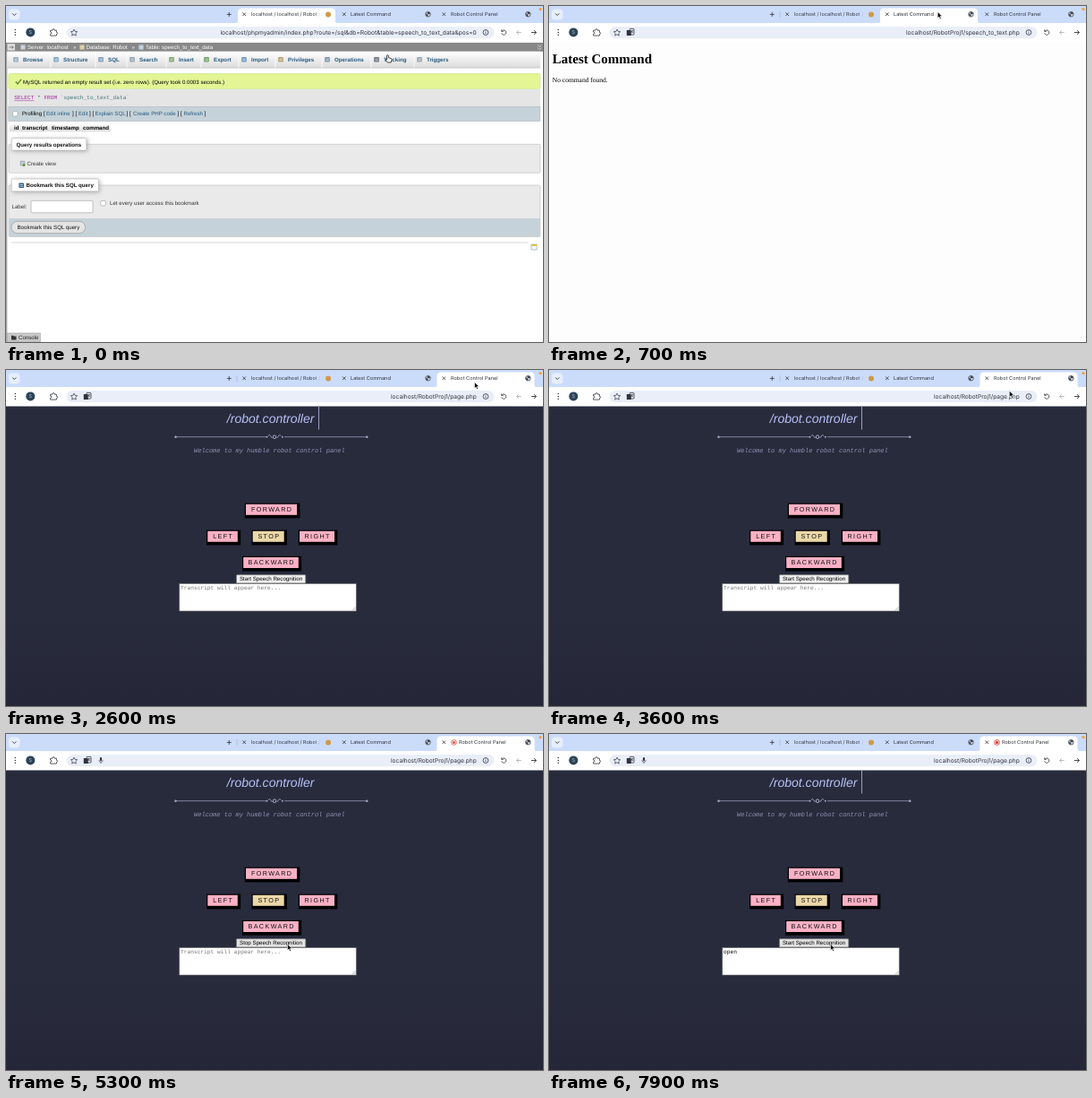
Recreate the animation shown at these times as an HTML page. Size 600 px wide and 375 px high, loop 8 s.

```html
<!DOCTYPE html>
<html lang="en">
<head>
<meta charset="utf-8">
<style>
html, body { margin: 0; width: 100%; height: 100%; overflow: hidden; background: #fdfdfd }
svg { display: block; width: 600px; height: 375px }
text { white-space: pre; text-rendering: geometricPrecision }
.ui { font-family: Inter, Roboto, sans-serif }
.sans { font-family: "Liberation Sans", Arial, sans-serif }
.serif { font-family: "Liberation Serif", Times, serif }
.mono { font-family: "Liberation Mono", "Courier New", monospace }
.b { font-weight: bold }
.i { font-style: italic }
.mid { text-anchor: middle }
.end { text-anchor: end }
.legend { filter: drop-shadow(1.4px 1.4px 2.4px #aaa) }
</style>
</head>
<body>
<svg id="stage" viewBox="0 0 600 375">
  <defs>
    <linearGradient id="menu" x2="0" y2="1"><stop stop-color="#fff"/><stop offset="1" stop-color="#dcdcdc"/></linearGradient>
    <linearGradient id="night" x2="0" y2="1"><stop offset=".7" stop-color="#282b3c"/><stop offset="1" stop-color="#252738"/></linearGradient>
    <linearGradient id="fade"><stop stop-color="#cbdcfb" stop-opacity="0"/><stop offset="1" stop-color="#cbdcfb"/></linearGradient>
    <linearGradient id="fadeOn"><stop stop-color="#fff" stop-opacity="0"/><stop offset="1" stop-color="#fff"/></linearGradient>
  </defs>
</svg>
<script>
const LOOP = 8000, OPEN_COMMAND = 500, OPEN_PANEL = 2600, LISTEN = 4700, HEARD = 6700, DONE = 7500;
const stage = document.getElementById('stage');

const attrs = o => Object.entries(o).map(([k, v]) => ` ${k}="${v}"`).join('');
const rect = (x, y, w, h, fill, o = {}) => `<rect x="${x}" y="${y}" width="${w}" height="${h}" fill="${fill}"${attrs(o)}/>`;
const dot = (x, y, r, fill, o = {}) => `<circle cx="${x}" cy="${y}" r="${r}" fill="${fill}"${attrs(o)}/>`;
const line = (d, stroke, w = 1, o = {}) => `<path d="${d}" fill="none" stroke="${stroke}" stroke-width="${w}"${attrs(o)}/>`;
const text = (s, x, y, size, fill, cls, o = {}) =>
  `<text x="${x}" y="${y}" font-size="${size}" fill="${fill}" class="${cls}"${attrs(o)}>${s.replace(/&/g, '&amp;')}</text>`;
const group = (id, body) => `<g id="${id}">${body}</g>`;

const INK = '#30343b', LINK = '#235a81';
const cross = x => line(`M${x - 1.8} 7.4l3.6 3.6m0-3.6l-3.6 3.6`, INK, .8);
const globe = x => dot(x, 9.2, 2.8, '#dfe6f2', { stroke: '#3f4650', 'stroke-width': .8 }) +
  `<path d="M${x - 2.6} 8.6l2 .6.8 1.4-.6 1.4q-2-.8-2.2-3.4zM${x - .4} 6.6q2.4-.2 3 2l-1.8.8-1.8-1z" fill="#3f4650"/>`;

function chrome() {
  const tabShape = x => `<path d="M${x - 4} 20q4 0 4-4V7q0-4.5 4.5-4.5h100q4.5 0 4.5 4.5v9q0 4 4 4z" fill="#fff"/>`;
  return rect(0, 0, 600, 20, '#cbdcfb') + rect(0, 19, 600, 21.5, '#fff') +
    group('active', tabShape(0)) +
    rect(0, 3, 109, 14, '#a1c1f6', { rx: 5, id: 'hover' }) +
    rect(3, 3.5, 12.5, 12, '#e6eefc', { rx: 4 }) + line('M7.2 8.4l2.1 2.1 2.1-2.1', INK, .9) +
    line('M246.8 9.4h5m-2.5-2.5v5', INK, .8) +
    line('M258 6v7', '#9fb3d6', .6, { id: 'sep' }) +
    cross(266.2) + text('localhost / localhost / Robot / s', 274, 11.4, 5.6, INK, 'ui') +
    rect(344, 4, 8, 12, 'url(#fade)', { id: 'fadeRect' }) + rect(352, 4, 16, 12, '#cbdcfb', { id: 'fadeEnd' }) +
    dot(360, 9.4, 3, '#d09a48') +
    cross(377.8) + text('Latest Command', 385, 11.4, 5.6, INK, 'ui') + globe(471.5) +
    cross(489.3) + text('Robot Control Panel', 497, 11.4, 5.6, INK, 'ui', { id: 'panelTitle' }) + globe(583.3) +
    group('rec', dot(500.5, 9.4, 2.9, 'none', { stroke: '#d93b30', 'stroke-width': .9 }) + dot(500.5, 9.4, 1.7, '#d93b30')) +
    dot(597, 3.6, 1.7, '#f2a33c') +
    [26.6, 29.4, 32.2].map(y => dot(10.3, y, .75, INK)).join('') +
    dot(27.3, 29.4, 5, '#2b4358') + text('S', 27.3, 31.4, 5.4, '#b8c9d6', 'ui mid') +
    line('M49.6 27.2h2.2q0-1.6 1.3-1.6t1.3 1.6h2v2.2q1.2 0 1.2 1t-1.2 1v1.7h-6.8v-1.9q1.4 0 1.4-1.1t-1.4-1.1z', INK, .8) +
    rect(67.5, 23, 478, 13.2, '#e9eef8', { rx: 6.6 }) +
    `<path d="M76 26l1.1 2.4 2.6.3-1.9 1.8.5 2.6-2.3-1.3-2.3 1.3.5-2.6-1.9-1.8 2.6-.3z" fill="none" stroke="${INK}" stroke-width=".7"/>` +
    group('translate', rect(90, 25.4, 5, 6.6, '#e9eef8', { stroke: INK, 'stroke-width': .8, rx: .6 }) + rect(86.8, 27, 5, 6, INK, { rx: .6 }) +
      line('M91.8 27.6h2.6m-1.3-.6v.6q0 1.6-1.3 2.4m.4-1.6l2 1.7', INK, .6)) +
    group('mic', rect(104.9, 26, 2.2, 4.2, INK, { rx: 1.1 }) + line('M103.8 29q0 2.4 2.2 2.4t2.2-2.4M106 31.4v1.7', INK, .6)) +
    text('', 525.8, 31.9, 6.62, INK, 'ui end', { id: 'url' }) +
    dot(536, 29.5, 2.9, 'none', { stroke: INK, 'stroke-width': .8 }) + line('M536 29.2v1.8M536 27.7v.8', INK, .7) +
    line('M554 28.2a2.6 2.6 0 1 1-.3 2.1M553.7 26.4v2h2', INK, .8) +
    line('M575.6 29.5h-5m2.2-2.3l-2.3 2.3 2.3 2.3', '#a5a9b0', .8) +
    line('M587 29.5h5.3m-2.3-2.4l2.4 2.4-2.4 2.4', INK, .9);
}

function database() {
  const menu = [['Browse', 19, '#8fa6ba'], ['Structure', 64, '#7fa4c8'], ['SQL', 114, '#7d9cbc'], ['Search', 149, '#8fa1b0'],
    ['Insert', 193, '#7ba46b'], ['Export', 232, '#6f9f62'], ['Import', 274, '#6c93b8'], ['Privileges', 315, '#b3a070'],
    ['Operations', 367, '#7890a8'], ['Tracking', 422, '#66707a'], ['Triggers', 470, '#93a2b0']];
  const icon = (x, y, c) => rect(x - 2.8, y - 2.8, 5.6, 5.6, c, { rx: .8 }) + line(`M${x - 1.6} ${y - .8}h3.4m-3.4 1.8h3.4`, '#fff', .6);
  const round = { rx: 1.5, stroke: '#b9b9b9', 'stroke-width': .6 };
  const field = { stroke: '#9a9a9a', 'stroke-width': .6 };
  const legend = (x, y, w, h) => rect(x, y, w, h, '#fff', { rx: 1, stroke: '#aaa', 'stroke-width': .5, class: 'legend' });
  const sans = (s, x, y, fill = '#333', cls = '') => text(s, x, y, 6.15, fill, 'sans ' + cls);
  return rect(0, 40, 600, 335, '#fff') +
    rect(0, 40.8, 600, 10, '#888') + rect(0, 50.8, 1.4, 325, '#aaa') +
    rect(1.5, 42.2, 8.5, 7.4, '#ddd') + line('M3.6 46h4.6m-1.6-1.5l1.6 1.5-1.6 1.5', '#555', .7) +
    icon(19, 46, '#b8bfc6') + sans('Server: localhost', 24, 48.2, '#fff') +
    sans('»', 75, 48.2, '#fff') + icon(85, 46, '#c9bd90') + sans('Database: Robot', 89.5, 48.2, '#fff') +
    sans('»', 140.5, 48.2, '#fff') + icon(151, 46, '#aebfd0') + sans('Table: speech_to_text_data', 156, 48.2, '#fff') +
    line('M594 43.6l2.2 2 2.2-2m-4.4 3l2.2 2 2.2-2', '#eee', .7) +
    rect(1.4, 50.8, 595.6, 18, 'url(#menu)') + line('M1.4 69h595.6', '#aaa', .6) +
    menu.map(([s, x, c], n) => icon(x - 8, 59.8, c) + (n ? line(`M${x - 14} 52v17`, '#fff', .8) : '') +
      text(s, x, 62, 6.2, LINK, 'sans b')).join('') +
    rect(2.8, 75.6, 594, 16.8, '#e4f596', { rx: 1.5, stroke: '#b9dc6a', 'stroke-width': .5 }) +
    line('M10.8 84.6l2.2 2.3 4-5', '#5f8f2e', 1.5) +
    sans('MySQL returned an empty result set (i.e. zero rows). (Query took 0.0003 seconds.)', 19, 86.6, '#000') +
    rect(2.5, 92.8, 594.5, 19.4, '#e5e5e5') +
    text('<tspan fill="#a3299c">SELECT</tspan> <tspan fill="#555">*</tspan> <tspan fill="#a3299c">FROM</tspan> `speech_to_text_data`', 9.3, 104, 6.13, '#477', 'mono') +
    line('M9.3 105.6h22', '#a3299c', .5) +
    rect(2.8, 112.3, 594, 16.2, '#c6d2d9', { stroke: '#aaa', 'stroke-width': .5 }) +
    rect(7.6, 117.6, 5.4, 5.4, '#fff', { ...field, rx: 1 }) +
    ['Profiling', '[', 'Edit inline', '] [', 'Edit', '] [', 'Explain SQL', '] [', 'Create PHP code', '] [', 'Refresh', ']']
      .map((s, n) => sans(s, [18, 42, 45, 74, 81, 93, 99.5, 134.5, 142, 191.5, 198.5, 221.5][n], 122.3, n > 1 && n % 2 == 0 ? LINK : '#000')).join('') +
    rect(3.5, 130.8, 113.5, 9.4, 'url(#menu)') +
    [['id', 9], ['transcript', 18], ['timestamp', 51], ['command', 86]].map(([s, x]) => text(s, x, 137.6, 6.15, '#000', 'sans b')).join('') +
    rect(3, 154.3, 594, 32, '#eaeaea', round) + legend(6.3, 147.6, 83.5, 13.4) + sans('Query results operations', 11.5, 156.5, '#111', 'b') +
    icon(18.5, 175.5, '#a7b0b8') + dot(20, 177.5, 1.6, '#5b9a3e') + sans('Create view', 23.5, 177.7) +
    rect(3, 200, 594, 57.5, '#eaeaea', round) + rect(3.3, 237, 593.4, 20, '#c6d2d9') +
    legend(6.3, 193, 97, 13.8) + icon(17.2, 200.3, '#35658c') + sans('Bookmark this SQL query', 22.5, 202.2, '#111', 'b') +
    sans('Label:', 6.5, 226) + rect(28, 217.3, 69, 13.5, '#fff', { ...field, rx: 1 }) +
    rect(105.8, 217.4, 5.5, 5.5, '#fff', { ...field, rx: 1 }) + sans('Let every user access this bookmark', 116, 222.3) +
    rect(6, 240.3, 82.5, 13.4, '#e4e4e4', { rx: 6.5, stroke: '#999', 'stroke-width': .7 }) + sans('Bookmark this SQL query', 12.5, 249.2, '#111') +
    line('M6 264h577', '#c4c4c4', .7) + rect(587, 266, 6, 6, '#fbfbfb', { stroke: '#8294a8', 'stroke-width': .6 }) + rect(587, 266, 6, 2, '#dcc24a') +
    rect(1.4, 365, 37, 10, '#c9c9c9', { stroke: '#999', 'stroke-width': .5 }) + rect(6, 368.6, 5.5, 4, '#333') + rect(6, 367.8, 2.6, 1.6, '#333') +
    sans('Console', 14, 372.4, '#222');
}

const command = () => rect(0, 40, 600, 335, '#fdfdfd') +
  text('Latest Command', 3.8, 64.4, 15, '#000', 'serif b') + text('No command found.', 3.8, 85.2, 7.5, '#000', 'serif');

function panel() {
  const key = (s, x, y, w, fill = '#fbb1c5') => rect(x - 1.2, y - 1.2, w + 4.5, 16.8, '#000') + rect(x, y, w, 12, fill) +
    text(s, x + w / 2 + .7, y + 8.4, 7.2, '#111', 'sans mid', { 'letter-spacing': 1.4 });
  const rule = '#a9accb';
  return rect(0, 40, 600, 335, 'url(#night)') +
    text('/robot.controller', 246.8, 58.6, 14.05, '#b8c1f7', 'sans i') +
    rect(349, 41, 1, 25.5, '#9a9fc4', { id: 'caret' }) +
    line('M189 74.7h102m20 0h92', rule, .7) + dot(189.5, 74.7, 1.2, rule) + dot(403.3, 74.7, 1.2, rule) +
    dot(291.5, 74.7, 1, rule) + dot(308.8, 74.7, 1, rule) + dot(300, 74.7, 1.8, 'none', { stroke: rule, 'stroke-width': 1 }) +
    line('M293 73.5q1.5-2 2.6 0t2 2.6m9.5-2.6q-1.5-2-2.6 0t-2 2.6', rule, .9) +
    text('Welcome to my humble robot control panel', 210, 92, 7.04, '#9093b3', 'mono i') +
    key('FORWARD', 268, 149.8, 57) + key('LEFT', 225.3, 179.8, 33.5) + key('STOP', 275.7, 179.8, 35, '#ebd8a8') +
    key('RIGHT', 328, 179.8, 39) + key('BACKWARD', 265.2, 209, 61.6) +
    rect(257.4, 228.6, 77.4, 9.3, '#efefef', { id: 'speech', rx: 1, stroke: '#6b6b6b', 'stroke-width': .7 }) +
    text('', 296, 235.4, 6.2, '#000', 'sans mid', { id: 'speechLabel' }) +
    rect(193.8, 238.6, 197.4, 30.4, '#fff', { stroke: '#777', 'stroke-width': .6 }) +
    line('M387 268.2l3.6-3.6m-1.6 3.6l1.6-1.6', '#777', .5) +
    text('', 195, 245.2, 6.23, '#000', 'mono', { id: 'transcript' });
}

const pointer = group('pointer',
  group('arrow', '<path d="M0 0v7l1.6-1.5 1.2 2.6 1.2-.5-1.2-2.6h2.3z" fill="#000" stroke="#fff" stroke-width=".6"/>') +
  group('hand', '<path d="M-.8 0q.8-.9 1.5 0l.3 2.8 3 .8q.8.4.5 1.6l-.8 2.8h-4l-2.3-3q.3-1 1.8 0z" fill="#fff" stroke="#000" stroke-width=".7"/>'));

stage.innerHTML += group('page0', database()) + group('page1', command()) + group('page2', panel()) + chrome() + pointer;
const el = id => document.getElementById(id);
const show = (id, on) => el(id).style.display = on ? '' : 'none';

const urls = ['localhost/phpmyadmin/index.php?route=/sql&db=Robot&table=speech_to_text_data&pos=0',
  'localhost/RobotProj1/speech_to_text.php', 'localhost/RobotProj1/page.php'];
const tabs = [259, 370, 481.5];
// time, x, y of the pointer; eased between entries
const path = [[0, 426.5, 55], [80, 426.5, 55], [480, 436, 9], [700, 434.2, 6.6], [1800, 434.2, 6.6], [2350, 523.5, 13.5],
  [3500, 523.5, 13.5], [4300, 314.5, 234.5], [LOOP, 314.5, 234.5]];

function pointerAt(t) {
  const n = path.findIndex(p => p[0] > t), [t0, x0, y0] = path[n - 1], [t1, x1, y1] = path[n];
  const u = (t - t0) / (t1 - t0), e = u * u * (3 - 2 * u);
  return [x0 + (x1 - x0) * e, y0 + (y1 - y0) * e];
}

function draw() {
  const t = performance.now() % LOOP;
  const page = t < OPEN_COMMAND ? 0 : t < OPEN_PANEL ? 1 : 2;
  const [x, y] = pointerAt(t);
  urls.forEach((_, n) => show('page' + n, n == page));
  el('url').textContent = urls[page];
  el('active').setAttribute('transform', `translate(${tabs[page]})`);
  show('sep', page);
  show('translate', page);
  el('fadeRect').setAttribute('fill', page ? 'url(#fade)' : 'url(#fadeOn)');
  el('fadeEnd').setAttribute('fill', page ? '#cbdcfb' : '#fff');

  const over = y < 19 ? tabs.findLastIndex(left => x >= left) : -1;
  show('hover', over >= 0 && over != page);
  if (over >= 0) el('hover').setAttribute('x', tabs[over]);

  const listening = t >= LISTEN, heard = t >= HEARD;
  show('mic', listening);
  show('rec', listening);
  el('rec').style.opacity = .8 + .2 * Math.cos((t - 6300) / 800 * 2 * Math.PI);
  el('panelTitle').setAttribute('x', listening ? 506 : 497);
  el('speechLabel').textContent = (listening && t < DONE ? 'Stop' : 'Start') + ' Speech Recognition';
  el('speech').setAttribute('fill', y > 228 ? '#e2e2e2' : '#efefef');
  el('transcript').textContent = heard ? 'open' : 'Transcript will appear here...';
  el('transcript').setAttribute('fill', heard ? '#000' : '#757575');
  show('caret', (t + 440) % 750 < 375);

  const hand = page == 0 && y > 50;
  show('hand', hand);
  show('arrow', !hand);
  el('pointer').setAttribute('transform', `translate(${x} ${y})`);
  requestAnimationFrame(draw);
}
draw();
</script>
</body>
</html>
```
